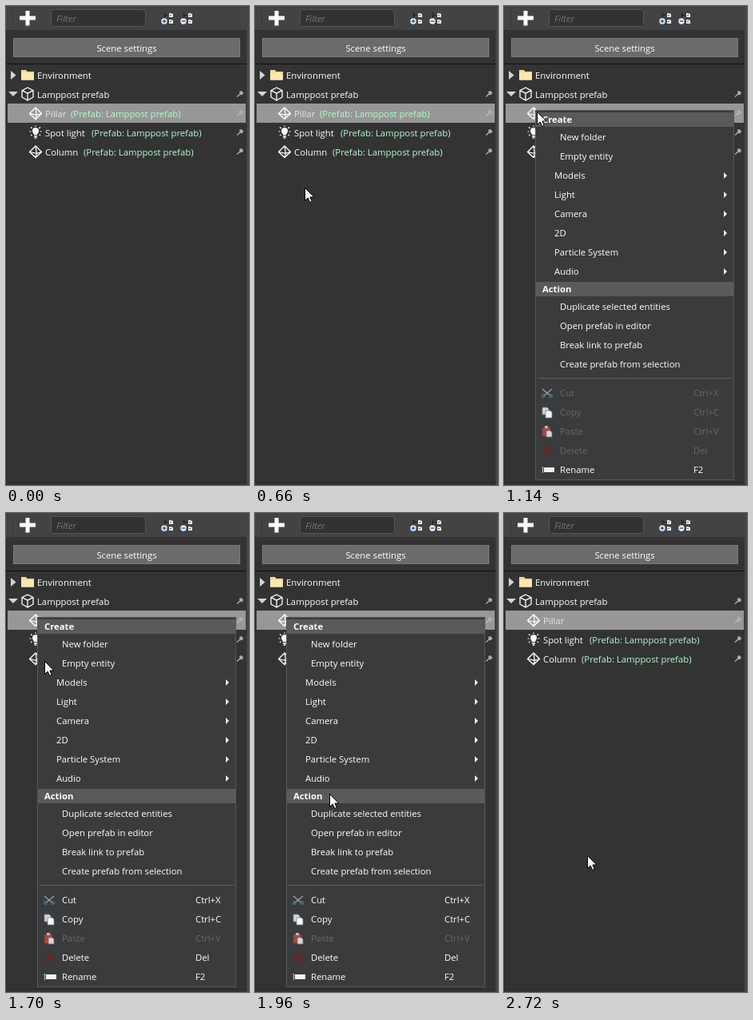
Recreate the animation shown at these times as an HTML page. Size 304 by 599 pixels, loop 3040 ms.

```html
<!DOCTYPE html>
<html lang="en">
<head>
<meta charset="utf-8">
<title>Scene tree</title>
<style>
html, body { margin: 0; width: 100%; height: 100%; overflow: hidden; background: #333; }
svg { display: block; width: 304px; height: 599px; }
text { font: 11.3px "Open Sans", "Noto Sans", sans-serif; fill: #fff; white-space: pre; }
.link { fill: #b4fccf; }
.head { font-weight: 700; }
.off { fill: #69696b; }
.hint { font-style: italic; fill: #757575; }
.hot { fill: #e6e6e6; }
rect { shape-rendering: crispEdges; }
</style>
</head>
<body>
<svg id="stage" viewBox="0 0 304 599" xmlns="http://www.w3.org/2000/svg"></svg>
<script>
const LOOP = 3040, STEP = 20;
const stage = document.getElementById('stage');

const rect = (x, y, w, h, fill, more = '') =>
  `<rect x="${x}" y="${y}" width="${w}" height="${h}" fill="${fill}" ${more}/>`;
const text = (x, y, s, more = '') => `<text x="${x}" y="${y}" ${more}>${s}</text>`;
const path = (d, fill, stroke = 'none', w = 1) =>
  `<path d="${d}" fill="${fill}" stroke="${stroke}" stroke-width="${w}" stroke-linejoin="round"/>`;
const at = (x, y, body, more = '') => `<g transform="translate(${x} ${y})" ${more}>${body}</g>`;

// Icons, each centred on 0,0
const gem = path('M0-7L7.5 .5L0 7.5L-7.5 .5Z', 'none', '#fff', 1.4) +
  path('M0-7L1.3 2.3L0 7.5M-7.5 .5L1.3 2.3L7.5 .5', 'none', '#fff', 1.2);
const cube = path('M0-8L7-4.4V4L0 8L-7 4V-4.4ZM-7-4.4L0-.8L7-4.4M0-.8V8', 'none', '#fff', 1.3);
const bulb = path('M-2 3.2C-2 1.6-4 .8-4-1.7A4 4 0 0 1 4-1.7C4 .8 2 1.6 2 3.2Z', '#fff') +
  path('M-2 5H2M-1.3 7H1.3', 'none', '#fff', 1.3) +
  path('M-7.5-1H-5.5M5.5-1H7.5M-6-6.5L-4.3-5M6-6.5L4.3-5M0-8.5V-7M-6 4L-4.6 2.8M6 4L4.6 2.8', 'none', '#fff', 1.2);
const folder = path('M-8-6H-2L-.5-4H8V6.5H-8Z', '#f3d992') + path('M-8-2.5H8V6.5H-8Z', '#fbe8b0');
const pin = path('M-4 3.6L0-.2', 'none', '#bdbdbd', 1.2) +
  path('M-.8-2.8L1.6-3.6L3.6-1.4L2.6 .6L.4 .9Z', '#a8a8a8', '#c9c9c9', .6);
const scissors = path('M-6-5L4 3.5M6-5L-4 3.5', 'none', '#98a3ab', 1.3) +
  '<g fill="none" stroke="#4f7791" stroke-width="1.4"><circle cx="-4.7" cy="3.6" r="1.6"/><circle cx="4.7" cy="3.6" r="1.6"/></g>';
const copy = path('M-6-6H0L2-4V3H-6Z', '#cfd6dd', '#76818b', .8) +
  path('M-2-2H4L6 0V7H-2Z', '#f4f6f8', '#76818b', .8);
const paste = path('M-6-5H4V6H-6Z', '#a24b45', '#7a3a37') + rect(-3, -7, 4, 3, '#b9b9b9') +
  path('M-1-1H4L6 1V7H-1Z', '#d7d3d3', '#7b7070', .8);
const remove = path('M-5-5.5L5.5 5.5M5.5-5.5L-5.5 5.5', 'none', '#7c1f1f', 2.2);
const rename = rect(-4, -3, 13, 6, '#f1f1f1') + rect(-6, -4, 1, 8, '#c4c4c4') + rect(-7, -3, 3, 1, '#8b8b8b');

function treeTool(x, sign) {
  const file = y => rect(10, y, 5, 5, '#ececec') + rect(13, y, 2, 1, '#777') + rect(11, y + 2, 2, 1, '#666');
  return at(x, 7, path('M4.5 1V8M4.5 4.5H8.5M4.5 12.5H8.5', 'none', '#1d1d1d', 1) + file(2) + file(10) +
    '<circle cx="4" cy="12" r="3.7" fill="#e9f2fb"/>' +
    path('M1.8 12H6.2' + (sign > 0 ? 'M4 9.8V14.2' : ''), 'none', '#235a9c', 1.4));
}

function panel() {
  let s = rect(0, 0, 304, 599, '#333') + rect(0, 0, 301, 30, '#434343') +
    rect(301, 0, 3, 599, '#464646') + rect(0, 30, 1, 569, '#292929') +
    rect(0, 72, 301, 1, '#0c0c0c') + rect(0, 595, 301, 1, '#282828');
  for (let y = 5; y < 26; y += 4) s += rect(8, y, 1, 2, '#2b2b2b');
  s += path('M24.5 6H29.5V12.5H37V17.5H29.5V24.5H24.5V17.5H17V12.5H24.5Z', '#fff');
  s += '<rect x="56.5" y="4.5" width="118" height="21" rx="4" fill="#323232" stroke="#555"/>';
  s += text(63, 20, 'Filter', 'class="hint"') + treeTool(194, 1) + treeTool(218, -1);
  s += rect(9.5, 40.5, 283, 23, '#6b6b6b', 'stroke="#7a7a7a"') +
    text(151, 57, 'Scene settings', 'text-anchor="middle"');
  return s;
}

const LABEL = '(Prefab: Lamppost prefab)';
function tree() {
  const row = (y, icon, name, linkX, id) => at(37, y - 1, icon) +
    text(49, y + 4, name, id ? 'class="hot"' : '') +
    text(linkX, y + 4, LABEL, `class="link" ${id ? `id="${id}"` : ''}`);
  let s = rect(2, 122, 298, 24, '#979797') +
    rect(2, 146, 298, 24, '#626262', 'id="hoverRow"');
  s += path('M6 81L12.5 86.5L6 92Z', '#d4d4d4') + at(27, 86, folder) + text(39, 91, 'Environment');
  s += path('M3 107H15L9 113Z', '#d4d4d4') + at(27, 110, cube) + text(39, 115, 'Lamppost prefab');
  s += row(135, gem, 'Pillar', 81, 'pillarLink') + row(159, bulb, 'Spot light', 107) + row(183, gem, 'Column', 97);
  for (let y = 110; y < 190; y += 24) s += at(293, y, pin);
  return s;
}

const plain = ['New folder', 'Empty entity'];
const groups = ['Models', 'Light', 'Camera', '2D', 'Particle System', 'Audio'];
const actions = ['Duplicate selected entities', 'Open prefab in editor', 'Break link to prefab', 'Create prefab from selection'];
const edits = [['Cut', 'Ctrl+X', scissors], ['Copy', 'Ctrl+C', copy], ['Paste', 'Ctrl+V', paste],
  ['Delete', 'Del', remove], ['Rename', 'F2', rename]];

function menu() {
  const head = (y, s) => rect(40, y, 247, 18, '#5a5a5b') + text(48, y + 13, s, 'class="head"');
  let s = rect(39.5, 130.5, 248, 462, '#3a3b3d', 'stroke="#57585a"') +
    head(133, 'Create') + head(345, 'Action') +
    rect(42, 413, 243, 22, '#a9a9a9', 'id="hoverItem"');
  plain.forEach((name, i) => s += text(70, 168 + 24 * i, name));
  groups.forEach((name, i) => {
    const y = 212 + 24 * i;
    s += text(63, y + 4, name) + path(`M275 ${y - 4}L279 ${y}L275 ${y + 4}Z`, '#f2f2f2');
  });
  actions.forEach((name, i) => s += text(70, 380 + 24 * i, name, 'data-action'));
  s += rect(42, 465, 243, 1, '#626364');
  edits.forEach(([name, key, icon], i) => {
    const y = 484 + 24 * i;
    s += at(54, y, icon) + `<g class="edit">${text(70, y + 4, name)}${text(237, y + 4, key)}</g>`;
  });
  return `<g id="menu">${s}</g>`;
}

const arrow = path('M.5 .5V16.5L4.2 13L6.7 18.5L9.2 17.4L6.9 12H11.8Z', '#fff', '#000');
stage.innerHTML = panel() + tree() + menu() + `<g id="cursor">${arrow}</g>`;

const el = id => document.getElementById(id);
const show = (node, on) => node.setAttribute('visibility', on ? 'inherit' : 'hidden');
const [hoverRow, pillarLink, menuBox, hoverItem, cursor] =
  ['hoverRow', 'pillarLink', 'menu', 'hoverItem', 'cursor'].map(el);
const editRows = [...document.querySelectorAll('.edit')];
const actionRows = [...document.querySelectorAll('[data-action]')];

// Time, x, y of the pointer inside the menu
const route = [[1480, 41, 132], [1700, 48, 185], [1960, 93, 351], [2020, 98, 370], [2260, 104, 428]];

function slope(i, axis) {
  if (i === 0 || i === route.length - 1) return 0;
  const a = route[i - 1], b = route[i + 1];
  return (b[axis] - a[axis]) / (b[0] - a[0]);
}

function pointer(t) {
  if (t < 1480) {
    const left = (1 - Math.min(1, (t - 420) / 400)) ** 1.667;
    return [41 + 98 * left, 132 + 438 * left];
  }
  if (t >= 2260) return [104, 428];
  const i = route.findIndex((k, n) => t < route[n + 1][0]);
  const a = route[i], b = route[i + 1], d = b[0] - a[0], u = (t - a[0]) / d;
  return [1, 2].map(n =>
    (1 + 2 * u) * (1 - u) ** 2 * a[n] + u * (1 - u) ** 2 * d * slope(i, n) +
    u * u * (3 - 2 * u) * b[n] + u * u * (u - 1) * d * slope(i + 1, n));
}

function itemTop(x, y) {
  if (x < 63) return 0;
  const first = y < 344 ? 201 : 365, count = y < 344 ? 6 : 4;
  const i = Math.floor((y - first) / 24);
  return i >= 0 && i < count ? first + 24 * i : 0;
}

function draw(time) {
  const t = time % LOOP, tick = Math.floor(t / STEP) * STEP;
  const [x, y] = pointer(Math.max(420, tick)).map(Math.round);
  const open = t >= 1140 && t < 2690;

  show(cursor, t >= 420);
  cursor.setAttribute('transform', `translate(${x} ${y})`);

  const overRow = t >= 420 && t < 1140 && y >= 146 && y < 194;
  show(hoverRow, overRow);
  if (overRow) hoverRow.setAttribute('y', y < 170 ? 146 : 170);

  show(menuBox, open);
  const top = open ? itemTop(x, y) : 0;
  show(hoverItem, top > 0);
  hoverItem.setAttribute('y', top);
  actionRows.forEach((row, i) => row.classList.toggle('hot', top === 365 + 24 * i));
  editRows.forEach((row, i) => {
    const off = i === 2 || (i < 4 && t < 1160);
    for (const label of row.children) label.classList.toggle('off', off);
  });
  show(pillarLink, t < 2720);
}

let start;
function frame(now) {
  start ??= now;
  draw(now - start);
  requestAnimationFrame(frame);
}
draw(0);
requestAnimationFrame(frame);
</script>
</body>
</html>
```
